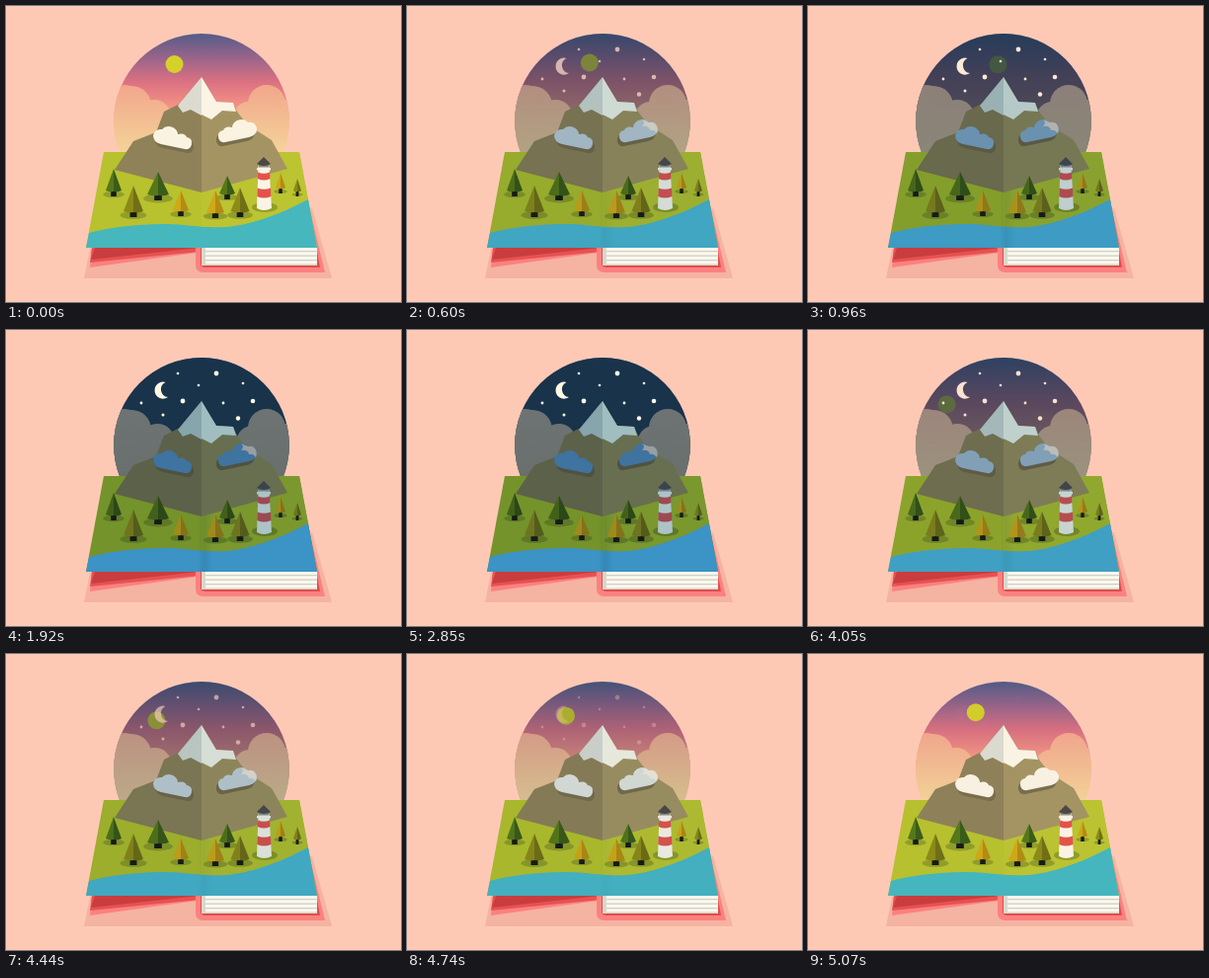
These frames come from a looping animation (400x300 px, 5.1 s). An HTML page with a canvas:

```html
<!DOCTYPE html>
<html lang="en">
<head>
<meta charset="utf-8">
<title>Pop-up book</title>
<style>
html, body { margin: 0; width: 100%; height: 100%; overflow: hidden; background: #fdc9b5; }
canvas { display: block; }
</style>
</head>
<body>
<canvas id="stage" width="400" height="300"></canvas>
<script>
const c = document.getElementById('stage').getContext('2d');
const LOOP = 5100;
let night = 0;

const rgb = h => [1, 3, 5].map(i => parseInt(h.slice(i, i + 2), 16));
function mix(day, dark) {
  const a = rgb(day), b = rgb(dark);
  return `rgb(${a.map((v, i) => Math.round(v + (b[i] - v) * night))})`;
}
function shape(d, fill) {
  c.fillStyle = fill;
  c.fill(new Path2D(d));
}
function oval(x, y, rx, ry, fill) {
  c.fillStyle = fill;
  c.beginPath();
  c.ellipse(x, y, rx, ry, 0, 0, 7);
  c.fill();
}
const dot = (x, y, r, fill) => oval(x, y, r, r, fill);
function rect(x, y, w, h, fill) {
  c.fillStyle = fill;
  c.fillRect(x, y, w, h);
}
function fade(y0, y1, ...stops) {
  const g = c.createLinearGradient(0, y0, 0, y1);
  stops.forEach((s, i) => g.addColorStop(i / (stops.length - 1), s));
  return g;
}

// x, y, radius
const stars = [[174, 44, 1.3], [213, 44, 2.4], [240, 54, 1.3], [195, 56, 1.3], [179, 72, 2.4],
  [137, 74, 1.4], [159, 86, 1.5], [250, 72, 2.3], [220, 74, 1.4], [235, 89.5, 2.2]];

// x, top, base, half width, kind
const trees = [[109, 165, 188, 8, 0], [154, 168, 192, 11, 0], [224, 172, 191, 8, 0],
  [278, 169, 185, 5, 2], [295, 175, 188, 4, 1], [177, 187, 208, 8, 2],
  [237, 184, 209, 9.5, 1], [129, 182, 209, 10, 1], [212, 187, 210, 9, 2]];
const leaves = [
  ['#55781a', '#42601a', '#3a5c1a', '#2c4818'],
  ['#8d8a18', '#6f7420', '#716f16', '#545c1c'],
  ['#d0a818', '#a08a1c', '#b28c14', '#84721a']];

function drawSky(t) {
  c.save();
  c.beginPath();
  c.arc(198, 116.8, 88.8, 0, 7);
  c.clip();
  rect(100, 20, 200, 190, fade(28, 148, '#535c88', '#98648a', '#d97082', '#f39084', '#f6c08b', '#f3dc9a'));

  const s = t > LOOP / 2 ? t - LOOP : t;
  dot(170.5 + .0255 * s - 2.8e-6 * s * s, 59 - .0073 * s + 8e-6 * s * s, 9, '#d6d02b');

  c.globalAlpha = night;
  rect(100, 20, 200, 190, '#19334b');
  c.globalAlpha = Math.min(1, night * 1.6);
  const glow = mix('#f8b4a8', '#fdf9e4');
  stars.forEach(([x, y, r]) => dot(x, y, r, glow));
  shape('M161.500 53A8.500 8.500 0 1 0 164 68A7.900 7.900 0 0 1 161.500 53Z', glow);
  c.globalAlpha = 1;

  const drift = 4 * Math.sin(Math.PI * t / LOOP) ** 2;
  const haze = fade(78, 148, mix('#f2a58c', '#6e7473'), mix('#f4d398', '#696f6d'));
  [[120, 100, 20], [127, 101, 20], [150 + drift, 112, 17], [246 + drift, 113, 16],
    [264, 99, 19], [283, 113, 18]].forEach(([x, y, r]) => {
    dot(x, y, r, haze);
    rect(x - r, y, 2 * r, 60, haze);
  });
  c.restore();
}

function drawBook() {
  shape('M85 246L79 276H330L310 205Z', '#f5b3a2');
  shape('M87 245H193V250L85 265Z', '#fb8180');
  shape('M87 245H196V249L85 260Z', '#e65251');
  shape('M90 245H196L86 257Z', '#c93d3f');
  shape('M192 245V262Q192 270 200 270H323L305 195L280 245Z', '#fb8180');
  shape('M197 245V262Q198 265 202 265H318L305 195L280 245Z', '#e04e4c');
  rect(198, 245, 117, 18, '#fbf8ee');
  for (let y = 248; y < 263; y += 4.5) rect(202, y, 113, 1.3, '#cfd0c6');
  rect(198, 245, 4, 18, '#d8d8cc');
}

function drawPage() {
  shape('M99 148H297L315 245H81Z', mix('#b8c12e', '#74932a'));
  shape('M198 148H297L315 245H198Z', mix('#bcc432', '#7a982e'));
  shape('M84 230C110 223 150 219 180 222S225 226 250 219S290 204 306 196L315 245H81Z', mix('#45b7bd', '#3b93c6'));
  const fold = c.createLinearGradient(194, 0, 210, 0);
  fold.addColorStop(0, 'rgba(0,40,40,0)');
  fold.addColorStop(.4, 'rgba(0,40,40,.1)');
  fold.addColorStop(1, 'rgba(0,40,40,0)');
  c.globalAlpha = night;
  rect(194, 180, 16, 65, fold);
  c.globalAlpha = 1;
}

const puff = 'M157 140Q149 138 149 131Q151 124 158 125Q162 120 169 123Q174 126 174 130Q181 128 183 133Q189 134 188 140Q187 146 181 145Z';
function drawPuff() {
  c.save();
  c.translate(2, 4);
  shape(puff, mix('#796f4e', '#4f5242'));
  c.restore();
  shape(puff, mix('#fbf3e2', '#3f73a0'));
}

function drawMountain() {
  shape('M110 166L129 137L152 128L160 107L176 99L198 72V189Z', mix('#8f8259', '#5c614a'));
  shape('M198 72L213 97L230 98L234 107L241 116L255 127L269 136L285 165L198 189Z', mix('#a59463', '#686f50'));
  shape('M198 72L174 101L179 108L187 105L198 111Z', mix('#dcdbd0', '#86a5ac'));
  shape('M198 72L213 97L230 98L233 107L219 106L208 115L198 110Z', mix('#fbf4e4', '#a0bec0'));
  drawPuff();
  c.save();
  c.translate(403, -7);
  c.scale(-1, 1);
  drawPuff();
  shape('M150 136Q148 131 151 127Q153 124 158 125L165 122Q161 125 165 129Q158 128 157 133Q153 132 150 136Z', mix('#fbf3e2', '#989fa1'));
  c.restore();
}

function drawTrees() {
  const shade = mix('#929e2a', '#5d7927');
  trees.forEach(([x, top, base, w, kind]) => {
    oval(x, base + 3, w * 1.35, w * .4, shade);
    const tw = w * .35;
    rect(x - tw, base - 1, tw * 2, 6, '#171b17');
    const [a, b, d, e] = leaves[kind];
    shape(`M${x} ${top}L${x - w} ${base - 1}Q${x - w / 2} ${base + 1} ${x} ${base}Z`, mix(a, b));
    shape(`M${x} ${top}L${x + w} ${base - 1}Q${x + w / 2} ${base + 1} ${x} ${base}Z`, mix(d, e));
  });
}

function drawLighthouse() {
  oval(262, 204, 13, 5, mix('#929e2a', '#5d7927'));
  const white = mix('#fbf4e6', '#adc3c7'), red = mix('#e4534a', '#9c4a52');
  shape('M255.500 162H266.500L269 205Q261 209 254 205Z', white);
  shape('M255.200 168.500Q261 171 267 168.500L267.500 175Q261 178 254.800 175Z', red);
  shape('M254.600 184.500Q261 187 268 184.500L268.500 193Q261 196 254.300 193Z', red);
  rect(256, 161, 10, 2.5, mix('#8f8a80', '#6f7f88'));
  rect(254, 164, 14, 2.5, white);
  shape('M261 153L254 160Q261 164 268 160Z', mix('#4b4846', '#3a434e'));
}

function frame(now) {
  const t = now % LOOP;
  night = Math.min(1, t / 1250, (LOOP - t) / 1620);
  rect(0, 0, 400, 300, '#fdc9b5');
  drawSky(t);
  drawBook();
  drawPage();
  drawMountain();
  drawTrees();
  drawLighthouse();
  requestAnimationFrame(frame);
}
requestAnimationFrame(frame);
</script>
</body>
</html>
```
